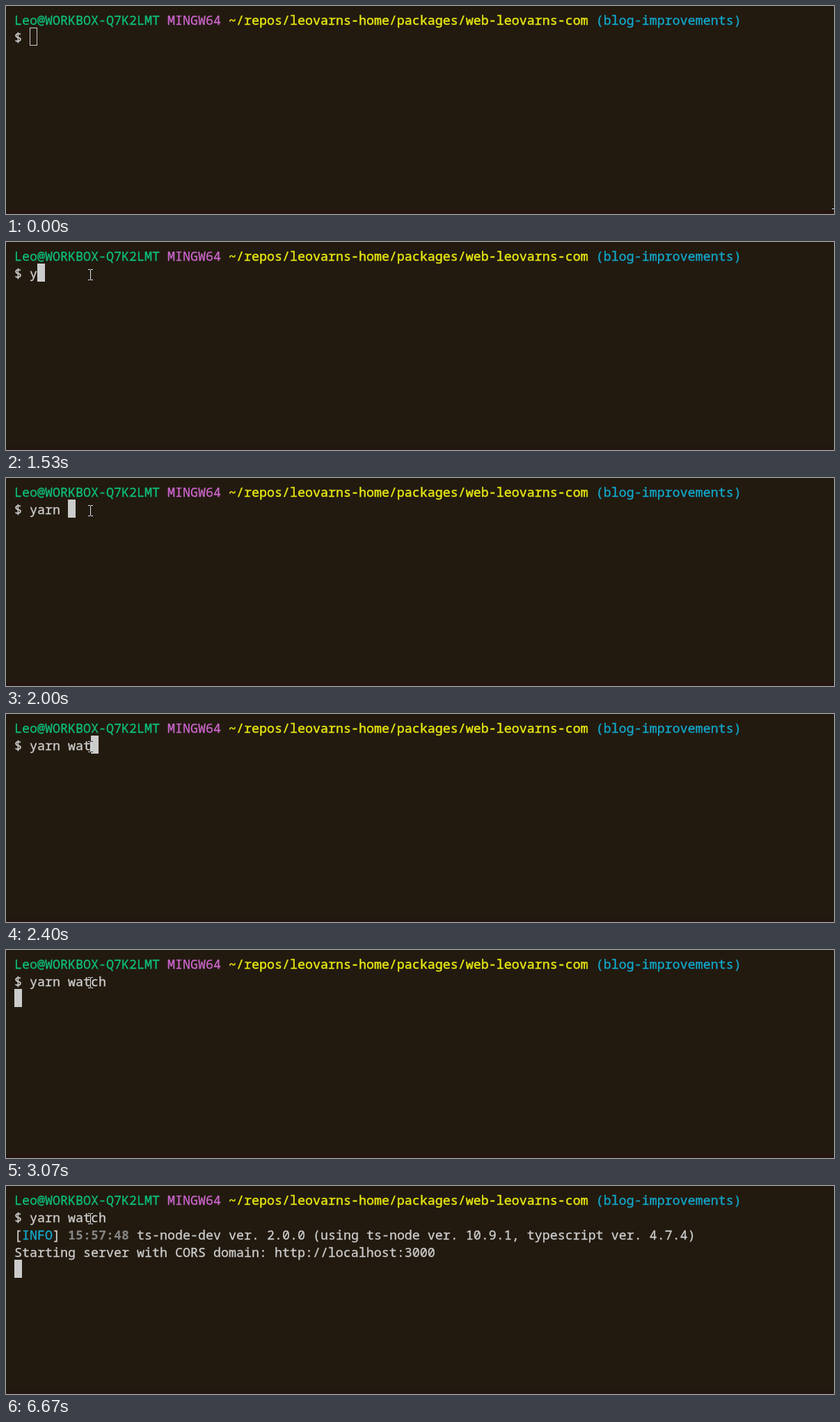
An HTML page that plays this animation: 1190x299 px, repeating every 8 s.

```html
<!DOCTYPE html>
<html lang="en">
<head>
<meta charset="utf-8">
<title>Terminal</title>
<style>
html, body { margin: 0; width: 100%; height: 100%; overflow: hidden; background: #221a0f; }
#term {
  position: relative; width: 1190px; height: 299px; overflow: hidden;
  background: #221a0f; color: #ccc;
  font: 18.333px/25px "Noto Sans Mono", monospace;
  font-variant-ligatures: none;
  -webkit-text-stroke: .35px currentColor;
}
#term > * { position: absolute; }
.line { left: 12px; height: 25px; white-space: pre; }
.green { color: #0dbc79; }
.pink { color: #c965c9; }
.yellow { color: #e5e510; -webkit-text-stroke-width: .5px; }
.cyan { color: #11a8cd; }
.time { color: #848484; font-weight: bold; -webkit-text-stroke-width: 0; }
.edge { left: 0; top: 294px; width: 100%; height: 5px; background: #24150f; }

#typed, #info, #server, #cursor, #mouse { animation: 8s step-end -8ms infinite; }
#typed { left: 34px; width: 110px; overflow: hidden; animation-name: type; }
#info { animation-name: info; }
#server { animation-name: server; }
#cursor {
  left: 12px; top: 31px; width: 11px; height: 26px; box-sizing: border-box;
  border: 1px solid #ccc; animation-name: cursor;
}
#mouse { left: 0; top: 0; mix-blend-mode: difference; animation-name: mouse; }

@keyframes type {
  0% { width: 0; }
  19.125% { width: 11px; }
  20% { width: 22px; }
  21.625% { width: 33px; }
  22.5% { width: 44px; }
  25% { width: 55px; }
  25.875% { width: 66px; }
  27.5% { width: 77px; }
  30% { width: 88px; }
  32.5% { width: 99px; }
  34.125%, 100% { width: 110px; }
}
@keyframes cursor {
  0% { transform: translate(22px, 0); background: transparent; }
  10% { transform: translate(22px, 0); background: #ccc; }
  19.125% { transform: translate(33px, 0); background: #ccc; }
  20% { transform: translate(44px, 0); background: #ccc; }
  21.625% { transform: translate(55px, 0); background: #ccc; }
  22.5% { transform: translate(66px, 0); background: #ccc; }
  25% { transform: translate(77px, 0); background: #ccc; }
  25.875% { transform: translate(88px, 0); background: #ccc; }
  27.5% { transform: translate(99px, 0); background: #ccc; }
  30% { transform: translate(110px, 0); background: #ccc; }
  32.5% { transform: translate(121px, 0); background: #ccc; }
  34.125% { transform: translate(132px, 0); background: #ccc; }
  38.375% { transform: translate(0, 25px); background: #ccc; }
  60% { transform: translate(0, 50px); background: #ccc; }
  83.375%, 100% { transform: translate(0, 75px); background: #ccc; }
}
@keyframes info {
  0% { visibility: hidden; }
  60%, 100% { visibility: visible; }
}
@keyframes server {
  0% { visibility: hidden; }
  83.375%, 100% { visibility: visible; }
}
@keyframes mouse {
  0%, .5% { transform: translate(1187px, 291px); animation-timing-function: cubic-bezier(.3, 0, .3, 1); }
  9.1%, 100% { transform: translate(118px, 39px); }
}
</style>
</head>
<body>
<div id="term">
  <div class="edge"></div>
  <div class="line" style="top:7px"><span class="green">Leo@WORKBOX-Q7K2LMT</span> <span class="pink">MINGW64</span> <span class="yellow">~/repos/leovarns-home/packages/web-leovarns-com</span> <span class="cyan">(blog-improvements)</span></div>
  <div class="line" style="top:32px">$</div>
  <div class="line" id="typed" style="top:32px">yarn watch</div>
  <div class="line" id="info" style="top:57px">[<span class="cyan">INFO</span>] <span class="time">15:57:48</span> ts-node-dev ver. 2.0.0 (using ts-node ver. 10.9.1, typescript ver. 4.7.4)</div>
  <div class="line" id="server" style="top:82px">Starting server with CORS domain: http://localhost:3000</div>
  <div id="cursor"></div>
  <svg id="mouse" width="7" height="16" fill="none" stroke="#fff">
    <path d="M0 .5H3M4 .5H7M3.5 1V15M0 15.5H3M4 15.5H7"/>
  </svg>
</div>
</body>
</html>
```
